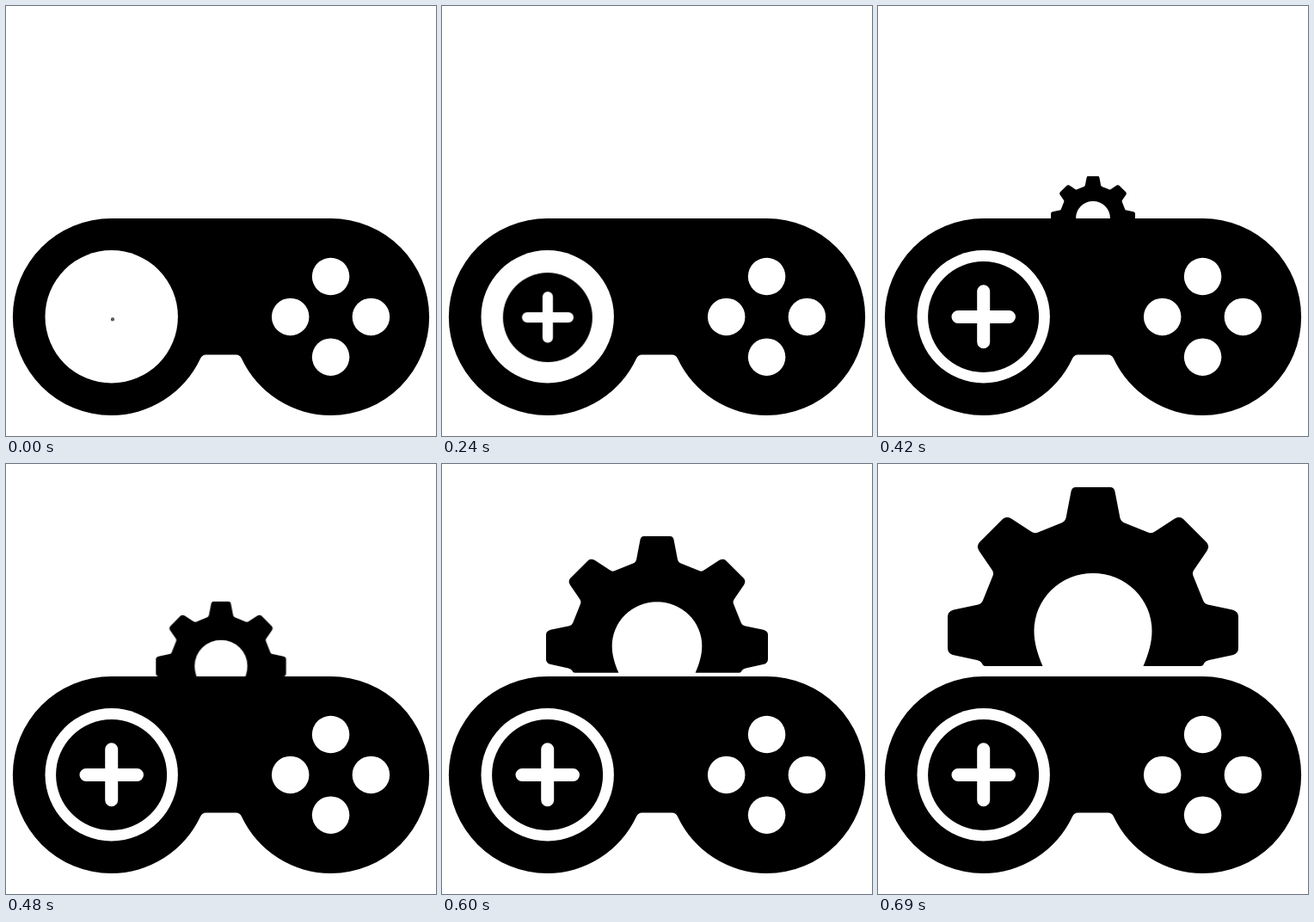
Recreate the animation shown at these times as an HTML page. Size 500 px wide and 500 px high, loop 1.16 s.

```html
<!DOCTYPE html>
<html lang="en">
<head>
<meta charset="utf-8">
<title>Game settings icon</title>
<style>
  html, body { margin: 0; width: 100%; height: 100%; overflow: hidden; background: #fff; }
  svg { display: block; width: 100vw; height: 100vh; }

  /* the 1 ms lead keeps each step safely before its tick */
  .pad, .gear { animation: 1160ms -1ms infinite; }
  .pad { transform-origin: 124px 364.4px; animation-name: pad; }
  .gear { transform-origin: 250px 267.7px; animation-name: gear; }

  /* 0-300 ms, one step every 30 ms */
  @keyframes pad {
    0% { transform: scale(.03); animation-timing-function: steps(10, end); }
    25.8621%, 100% { transform: scale(1); }
  }
  /* 330-690 ms, one step every 30 ms */
  @keyframes gear {
    0% { transform: scale(.0533); animation-timing-function: step-end; }
    28.4483% { transform: scale(.0533); animation-timing-function: steps(12, end); }
    59.4828%, 100% { transform: scale(1); }
  }
</style>
</head>
<body>
<svg viewBox="0 0 500 500">
  <g class="gear">
    <path id="half" d="M251 27H230Q225.5 27 224.5 32L218.5 63Q217.5 66.500 214.500 68L186 79.500
      Q182 81.500 178 78.500L155 63.500Q149 60.500 145 64L118 91Q114 95.500 117.500 101L132.500 123
      Q135 126.500 133.500 130L122 158.500Q120.500 162.500 116.500 163.500L88 169.500Q81 171.500 81 177
      V214Q81 220 87 222L115 228Q119.500 229 121 232Q122 235 125 235H191.500
      C185 220 181.500 207 181.500 194A68.500 67 0 0 1 250 127H251Z"/>
    <use href="#half" transform="matrix(-1 0 0 1 500 0)"/>
  </g>

  <path d="M122.300 247H377.700A114.500 114.500 0 0 1 377.700 476A114.500 114.500 0 0 1 274 410
    Q272 405.500 267.500 405.500H232.500Q228 405.500 226 410A114.500 114.500 0 0 1 122.300 476
    A114.500 114.500 0 0 1 122.300 247Z"/>
  <g fill="#fff">
    <circle cx="122.7" cy="361.3" r="77.2"/>
    <circle cx="377.6" cy="314.5" r="21.75"/>
    <circle cx="330.7" cy="361.4" r="21.75"/>
    <circle cx="424.4" cy="361.4" r="21.75"/>
    <circle cx="377.6" cy="408.2" r="21.75"/>
  </g>

  <g class="pad">
    <circle cx="122.6" cy="361.5" r="64.5"/>
    <path d="M93 361.500H152.500M122.700 331.700V390.700" stroke="#fff" stroke-width="15" stroke-linecap="round"/>
  </g>
</svg>
</body>
</html>
```
